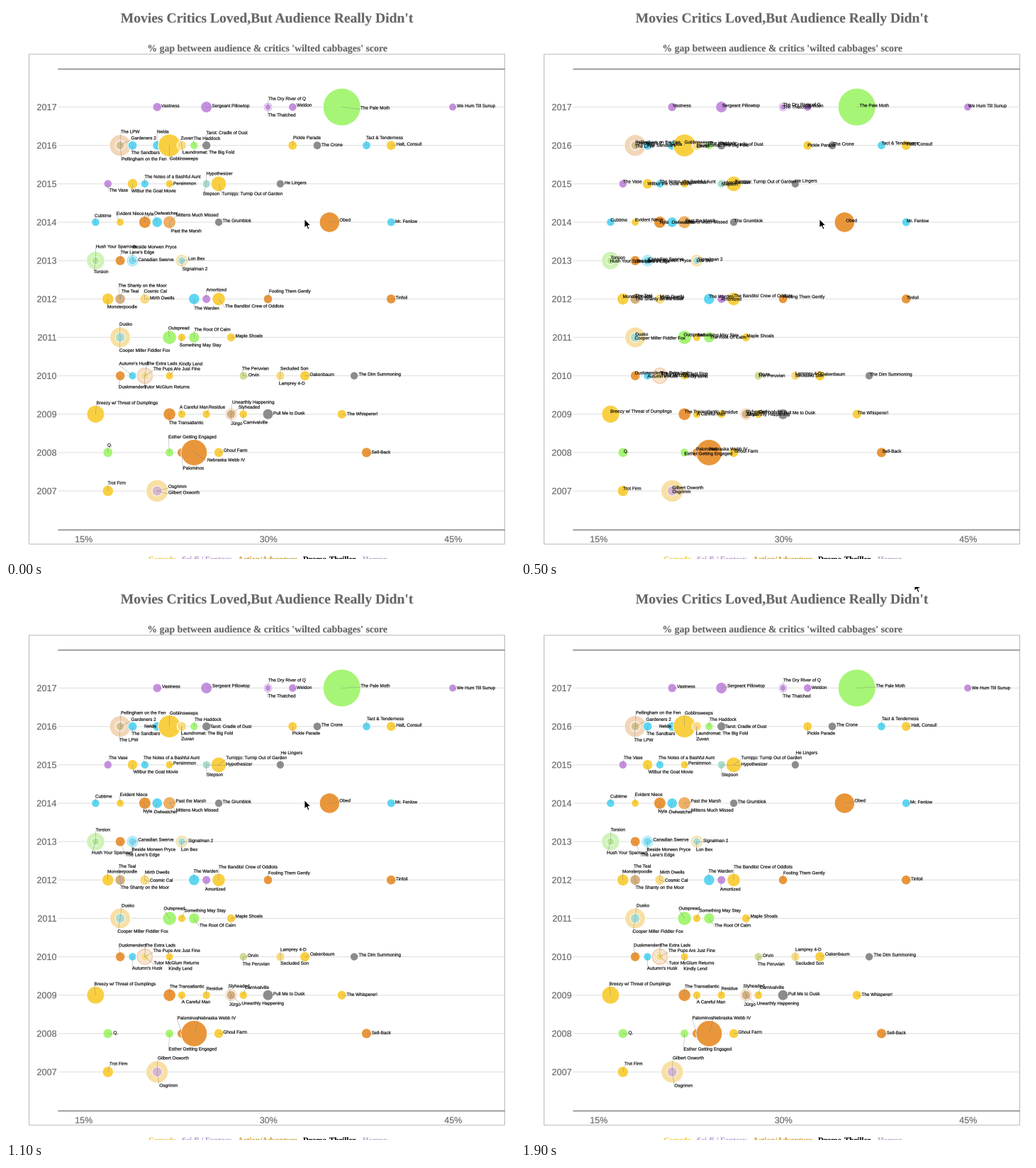
These frames come from a looping animation (718x780 px, 2 s). A matplotlib script:

```python
import matplotlib.pyplot as plt
from matplotlib.animation import FuncAnimation
from matplotlib.patches import Circle, PathPatch, Polygon, Rectangle
from matplotlib.textpath import TextPath
from matplotlib.transforms import Affine2D

W, H, DPI = 718, 780, 100
STEP, FRAMES = 100, 20
PX = 72 / DPI  # points per pixel

plt.rcParams["path.snap"] = False

COLOURS = {
    "P": "#c58fde", "G": "#a6f576", "C": "#5ed6f2", "Y": "#f9cf42",
    "O": "#e9963b", "K": "#8c8c8c",
    "p": "#d5afe6", "g": "#cff3b7", "c": "#a0e4f5", "y": "#f8e0a4",
    "o": "#f3d5b7", "m": "#a9dccf", "t": "#d3b081", "h": "#d7c08c",
    "a": "#eeb064", "l": "#d8b6cc", "e": "#d3da96", "b": "#f9db82",
    "n": "#b4e793", "i": "#7cdbf3",
}

fig = plt.figure(figsize=(W / DPI, H / DPI), dpi=DPI, facecolor="white")
ax = fig.add_axes([0, 0, 1, 1])
ax.set_xlim(0, W)
ax.set_ylim(H, 0)
ax.axis("off")


class Words:
    """Text as outlines, so that it can rest between whole pixels."""

    def __init__(self, x, y, s, size, color="#666666", align=0,
                 font="Liberation Sans", weight="normal", z=4):
        path = TextPath((0, 0), s, size=size,
                        prop={"family": font, "weight": weight})
        self.dx = -align * path.get_extents().x1
        self.patch = ax.add_patch(PathPatch(path, fc=color, ec=color,
                                            lw=0.15 * PX, zorder=z))
        self.move(x, y)

    def move(self, x, y):
        shift = Affine2D().scale(1, -1).translate(x + self.dx, y)
        self.patch.set_transform(shift + ax.transData)


def serif(x, y, s, size, color="#666666", align=0):
    Words(x, y, s, size, color, align, "Liberation Serif", "bold")


def hline(y, color, width):
    ax.plot([74, 703], [y, y], color=color, lw=width * PX, zorder=1)


def pct_x(pct):
    return 109 + 17.37 * (pct - 15)


def year_y(year):
    return 142.5 + 54.15 * (2017 - year)


class Film:
    """A bubble with a label that has an old and a new resting place."""

    def __init__(self, year, name, pct, r, tone, x0, y0, x1, y1):
        self.home = pct_x(pct), year_y(year)
        self.old = x0, y0 + 2.3
        self.new = x1, y1 + 2.3
        ax.add_patch(Circle(self.home, r + 0.45, fc=COLOURS[tone], ec="white",
                            lw=0.9 * PX, zorder=2))
        self.link, = ax.plot([], [], color="#808080", alpha=0.75,
                             lw=0.5 * PX, zorder=3)
        self.label = Words(*self.home, name, 6.35, "black")

    def place(self, pos):
        self.label.move(*pos)
        self.link.set_data([self.home[0], pos[0]], [self.home[1], pos[1]])

    def spread(self, k):
        (hx, hy), (x, y) = self.home, self.new
        self.place((hx + (x - hx) * k, hy + (y - hy) * k))


films = []


def row(year, *items):
    for item in sorted(items, key=lambda f: (f[1], -f[2])):
        films.append(Film(year, *item))


# headings, frame and axes
serif(368, 23.3, "Movies Critics Loved,But Audience Really Didn't", 19.6,
      align=0.5)
serif(368.5, 64, "% gap between audience & critics 'wilted cabbages' score",
      13.8, align=0.5)
ax.add_patch(Rectangle((32.5, 68), 671, 691, fc="none", ec="#b8b8b8",
                       lw=PX, zorder=1))
for year in range(2007, 2018):
    hline(year_y(year), "#e2e2e2", 1.2)
    Words(71, year_y(year) + 4.5, str(year), 12.7, align=1)
for y in (89, 739):
    hline(y, "#7d7d7d", 1.4)
for pct in (15, 30, 45):
    Words(pct_x(pct) + 0.5, 756.3, f"{pct}%", 12.5, align=0.5)

for x, word, tone in (
    (201, "Comedy,", "#f2cb45"), (248, "Sci-fi / Fantasy,", "#b79ad2"),
    (327, "Action/Adventure,", "#d0a238"), (419, "Drama,", "black"),
    (456, "Thriller,", "black"), (503, "Horror", "#b9a6c6"),
):
    serif(x, 783.8, word, 11, tone)

# name, gap, radius, tone, old label x y, new label x y
row(2017,
    ("Vastness", 21, 5.8, "P", 219, 140.5, 220, 140),
    ("Sergeant Pillowtop", 25, 7.5, "P", 290.5, 140.5, 291, 139),
    ("The Dry River of Q", 30, 6, "p", 370, 130.5, 370, 131),
    ("The Thatched", 30, 4, "P", 369.5, 153.5, 369.5, 153.5),
    ("Weldon", 32, 5.3, "P", 410, 139.5, 410, 141.5),
    ("The Pale Moth", 36, 26, "G", 500, 143.5, 500.5, 139),
    ("We Hum Till Sunup", 45, 5, "P", 636, 140.5, 636, 142))
row(2016,
    ("The LPW", 18, 14.7, "o", 162, 177, 160, 215.5),
    ("Gardeners 2", 18, 5.5, "h", 176.5, 186, 176.5, 186.5),
    ("Pellingham on the Fen", 18, 6.8, "t", 163, 215.5, 162, 177),
    ("The Sandbars", 19, 6, "C", 177, 206.5, 177.5, 206.5),
    ("Nelda", 21, 6, "C", 213, 177, 195, 196),
    ("Goblinsweeps", 22, 15.5, "Y", 231, 215, 231, 177.5),
    ("Zuvan", 23, 6.2, "b", 246.5, 186, 247.5, 214),
    ("Laundromat: The Big Fold", 23, 6.2, "b", 249, 206, 247, 206),
    ("The Haddock", 24, 5.2, "G", 264.5, 186.5, 266, 186.5),
    ("Tarot: Cradle of Dust", 25, 5.7, "K", 282.5, 178.5, 288, 196.5),
    ("Pickle Parade", 32, 6, "Y", 405, 185.5, 404, 206),
    ("The Crone", 34, 5.4, "K", 445, 195.5, 445, 194),
    ("Tact & Tenderness", 38, 5.4, "C", 508, 185.5, 509, 185.5),
    ("Halt, Consul!", 40, 6.3, "Y", 550.5, 194.5, 550.5, 194.5))
row(2015,
    ("The Vase", 17, 5.3, "P", 145.5, 259.5, 145, 240.5),
    ("Wilbur the Goat Movie", 19, 6.8, "Y", 177, 260.5, 180, 260.5),
    ("The Notes of a Bashful Aunt", 20, 5.2, "C", 195.5, 240.5, 194, 240.5),
    ("Persimmon", 22, 5.1, "Y", 236, 250, 236, 248),
    ("Hypothesizer", 25, 5.2, "m", 282.5, 236, 310.5, 249.5),
    ("Stepson", 25, 5.2, "m", 278, 264.5, 283, 264.5),
    ("Turnipjo: Turnip Out of Garden", 26, 10.3, "Y",
     304.5, 264.5, 310.5, 240.5),
    ("He Lingers", 31, 5.2, "K", 393, 249, 387.5, 233.5))
row(2014,
    ("Cubtime", 16, 5.3, "C", 125, 295.5, 126, 295),
    ("Evident Niece", 18, 5, "Y", 155.5, 292.5, 160.5, 292.5),
    ("Nyla", 20, 8, "O", 195.5, 293, 193.5, 316),
    ("Owlwatcher", 21, 6.8, "C", 209, 292, 208.5, 317),
    ("Mittens Much Missed", 22, 8.5, "a", 240, 294.5, 240, 314.5),
    ("Past the Marsh", 22, 8.5, "a", 233, 317, 239.5, 301.5),
    ("The Grumblok", 26, 5.2, "K", 305.5, 302.5, 305.5, 302.5),
    ("Obed", 35, 13.8, "O", 470.5, 301.5, 470.5, 301),
    ("Mr. Fenlow", 40, 5.5, "C", 549, 303.5, 549, 303))
row(2013,
    ("Hush Your Sparrows", 16, 5, "n", 126.5, 339, 121, 374.5),
    ("Torsion", 16, 12.3, "g", 124, 374.5, 126.5, 342),
    ("The Lane's Edge", 18, 6.5, "O", 161.5, 347, 169, 377.5),
    ("Beside Morwen Pryce", 19, 5.6, "i", 179, 339.5, 177.5, 370),
    ("Canadian Swerve", 19, 8, "c", 186.5, 357.5, 186.5, 356),
    ("Lon Bex", 23, 5, "m", 257, 356, 247, 370),
    ("Signalman 2", 23, 8.3, "y", 249, 370.5, 257, 357.5))
row(2012,
    ("Monsterpoodle", 17, 7.8, "Y", 143, 424, 143, 401),
    ("The Shanty on the Moor", 18, 6.8, "t", 158.5, 394, 162, 423.5),
    ("The Teal", 18, 6.8, "t", 163, 402, 159, 393.5),
    ("Cosmic Cal", 20, 6.6, "b", 194.5, 402, 203, 413.5),
    ("Mirth Dwells", 20, 6.6, "b", 203, 411.5, 196, 402),
    ("The Warden", 24, 7.3, "C", 266, 426, 264.5, 400.5),
    ("Amortized", 25, 5.6, "P", 282.5, 400, 281, 426),
    ("The Bandits! Crew of Oddlots", 26, 8.8, "Y", 309, 423, 300, 394.5),
    ("Fooling Them Gently", 30, 5.9, "O", 371, 402, 370, 403),
    ("Tinfoil", 40, 6.3, "O", 549.5, 411, 550, 411.5))
row(2011,
    ("Dusko", 18, 14, "y", 160, 448.5, 163, 449),
    ("Cooper Miller Fiddler Fox", 18, 6.3, "m", 160, 485.5, 157.5, 485.5),
    ("Outspread", 22, 9.3, "G", 229, 454, 222.5, 453),
    ("Something May Stay", 23, 5.2, "Y", 245, 478, 251.5, 456),
    ("The Root Of Calm", 24, 7.2, "G", 265.5, 456, 273, 477),
    ("Maple Shoals", 27, 5.6, "Y", 323.5, 465, 323.5, 464))
row(2010,
    ("Duskmenders", 18, 6.3, "O", 159, 537, 159, 505),
    ("Autumn's Husk", 19, 5.2, "C", 159.5, 504, 178, 537.5),
    ("The Extra Lads", 20, 11.6, "o", 198.5, 504, 196, 505),
    ("The Pups Are Just Fine", 20, 5.2, "b", 208, 511.5, 208, 512.5),
    ("Tutor McGlum Returns", 20, 7.8, "o", 195, 537, 208.5, 530),
    ("Kindly Lend", 22, 5.1, "Y", 244, 504.5, 229.5, 538),
    ("The Peruvian", 28, 5.4, "e", 333, 511, 334, 531.5),
    ("Orvin", 28, 5.4, "e", 342, 520, 341, 519.5),
    ("Secluded Son", 31, 5.8, "b", 387, 511, 387.5, 530.5),
    ("Lamprey 4-D", 31, 5.8, "b", 385, 532, 387, 511),
    ("Oakenbaum", 33, 6.6, "Y", 428.5, 519.5, 429, 517.5),
    ("The Dim Summoning", 37, 5.2, "K", 497.5, 519, 497.5, 518.5))
row(2009,
    ("Breezy w/ Threat of Dumplings", 16, 12, "Y", 127.5, 559.5, 124.5, 559.5),
    ("The Transatlantic", 22, 8.3, "O", 230, 587.5, 231, 563),
    ("A Careful Man", 23, 5.3, "Y", 245, 565.5, 248, 585),
    ("Residue", 25, 5.3, "Y", 286, 565.5, 282.5, 566),
    ("Jürgo", 27, 8.3, "o", 317.5, 588.5, 315, 588.5),
    ("Unearthly Happening", 27, 6, "t", 319, 558.5, 332.5, 587),
    ("Slyheaded", 27, 6, "t", 328, 565.5, 313.5, 562.5),
    ("Carnivalville", 28, 5.4, "Y", 335, 587, 337, 564.5),
    ("Pull Me to Dusk", 30, 7, "K", 377, 574, 377, 573.5),
    ("The Whisperer!", 36, 6.1, "Y", 481, 575, 480.5, 574.5))
row(2008,
    ("Q.", 17, 6.4, "G", 143, 619, 151.5, 628.5),
    ("Esther Getting Engaged", 22, 5.6, "G", 229, 607.5, 229.5, 651.5),
    ("Palominos", 23, 6, "O", 249.5, 651.5, 241.5, 607.5),
    ("Nebraska Webb IV", 24, 18, "O", 284, 640, 271, 607.5),
    ("Ghoul Farm", 26, 6.3, "Y", 307, 626.5, 306.5, 627.5),
    ("Sell-Back", 38, 6.6, "O", 515.5, 629, 516, 628.5))
row(2007,
    ("Trot Firm", 17, 7.3, "Y", 143.5, 672.5, 146, 672),
    ("Osgrimm", 21, 15.2, "y", 229, 677.5, 216.5, 703),
    ("Gilbert Oxworth", 21, 6.6, "l", 229, 686, 214, 664))

ARROW = [(0, 0), (0, 12.4), (2.8, 9.8), (5, 14.6), (7, 13.7), (4.9, 9),
         (8.7, 8.8)]
cursor = ax.add_patch(Polygon(ARROW, fc="black", ec="white", lw=0.9 * PX,
                              zorder=6))


def ease(u):
    """Cubic in-out."""
    u = min(max(u, 0), 1)
    return 4 * u ** 3 if u < 0.5 else 1 - 4 * (1 - u) ** 3


def draw(i):
    t = i * STEP
    for film in films:
        if t < 100:
            film.place(film.old)
        else:
            film.spread(ease((t - 135) / 1100))
    k = min(max((t - 1700) / 200, 0), 1)
    cx, cy = 421 + 134 * k, 300.5 - 307.5 * k
    cursor.set_xy([(cx + x, cy + y) for x, y in ARROW])
    return []


anim = FuncAnimation(fig, draw, frames=FRAMES, interval=STEP, repeat=True,
                     repeat_delay=0, init_func=lambda: draw(0), blit=False)
plt.show()
```
